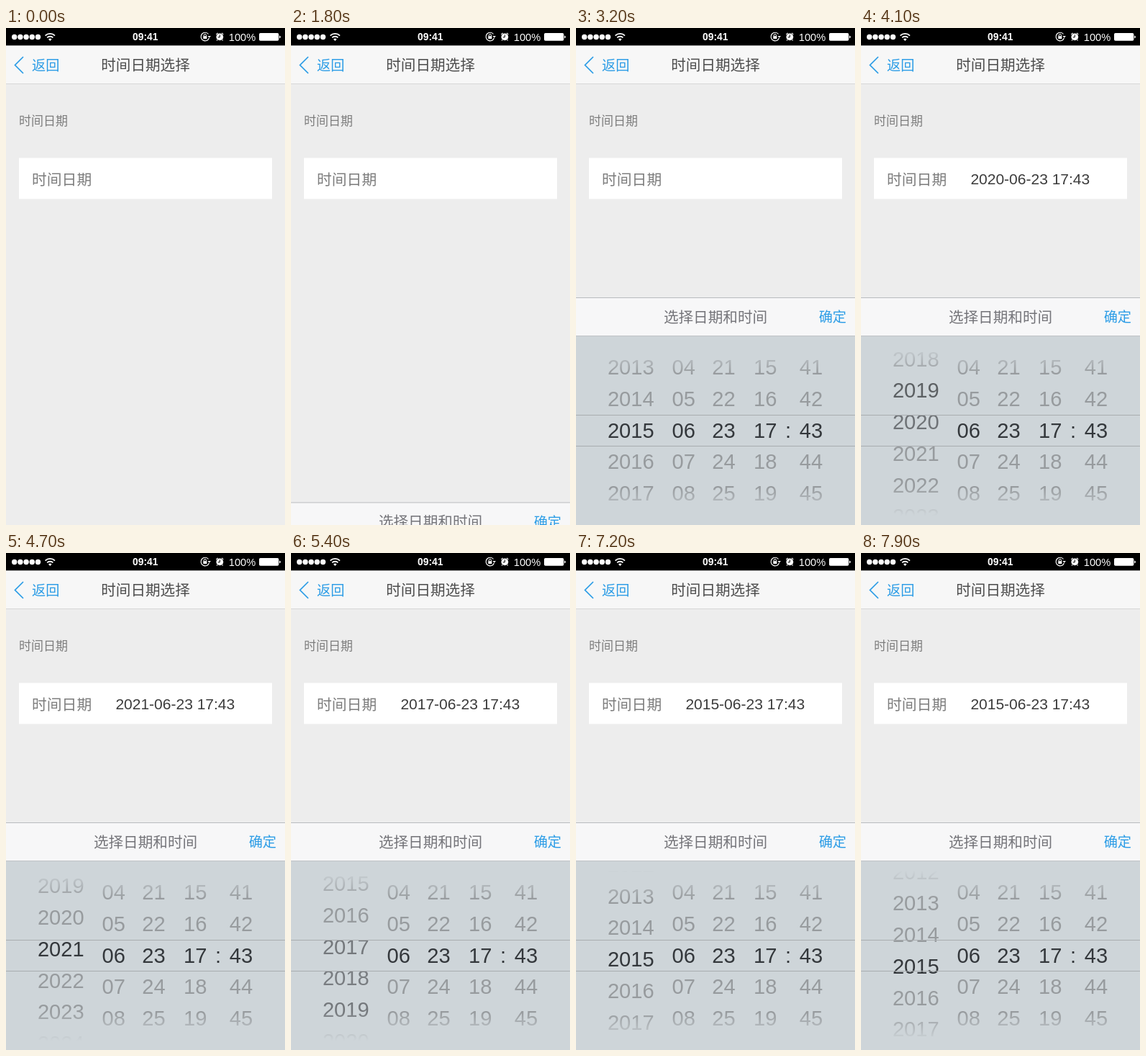
An HTML page for the animation above (8000 ms loop, 388 by 690 pixels).

```html
<!DOCTYPE html>
<html lang="zh-CN">
<head>
<meta charset="utf-8">
<title>时间日期选择</title>
<style>
  html, body { margin: 0; width: 100%; height: 100%; overflow: hidden; background: #ededed; }
  svg { display: block; width: 388px; height: 690px; }
  text { font-family: "Noto Sans CJK SC", "Noto Sans CJK", sans-serif; font-weight: 300; }
  .num { font-family: "Liberation Sans", Arial, sans-serif; font-weight: 400; }
  .mid { text-anchor: middle; }
  .link { fill: #2b9ce6; font-size: 19.2px; }
  .wheel text { font-size: 29.1px; }
</style>
</head>
<body>
<svg viewBox="0 0 388 690">
  <defs>
    <linearGradient id="fade" x1="0" y1="0" x2="0" y2="1">
      <stop offset=".05" stop-color="#000"/>
      <stop offset=".2" stop-color="#fff"/>
      <stop offset=".8" stop-color="#fff"/>
      <stop offset=".95" stop-color="#000"/>
    </linearGradient>
    <mask id="window" maskUnits="userSpaceOnUse" x="0" y="428" width="388" height="262" style="mask-type:luminance">
      <rect y="428" width="388" height="262" fill="url(#fade)"/>
    </mask>
  </defs>

  <rect width="388" height="690" fill="#ededed"/>

  <!-- navigation bar -->
  <rect y="24" width="388" height="53.7" fill="#f7f7f7"/>
  <rect y="77.1" width="388" height=".6" fill="#c4c4c4"/>
  <path d="M24 40L12.5 51.5L24 63" fill="none" stroke="#2b9ce6" stroke-width="1.7"/>
  <text class="link" x="36" y="58.6">返回</text>
  <text class="mid" x="194" y="58.9" font-size="20.6" fill="#4c4c4c">时间日期选择</text>

  <!-- status bar -->
  <rect width="388" height="24.3" fill="#000"/>
  <g id="dots" fill="#fff"></g>
  <g fill="none" stroke="#fff" stroke-width="1.9">
    <path d="M54.6 10.6a9.6 9.6 0 0 1 13.4 0M57.2 13.4a6 6 0 0 1 8.2 0"/>
    <path d="M61.3 18l-2.3-2.4a3.4 3.4 0 0 1 4.6 0z" fill="#fff" stroke="none"/>
    <path d="M281.5 8.5A5.8 5.8 0 1 0 282.4 14" stroke-width="1.2"/>
    <path d="M280.5 11h4.4l-2.2 2.8z" fill="#fff" stroke="none"/>
    <path d="M275.2 11.5v-1.4a1.6 1.6 0 0 1 3.2 0v1.4" stroke-width="1"/>
    <rect x="274.3" y="11.2" width="5" height="3.8" fill="#fff" stroke="none"/>
    <circle cx="297.3" cy="12.4" r="4.9" fill="#fff" stroke="none"/>
    <path d="M292.3 9.2l2.3-2.3M302.3 9.2L300 6.9M294 16.4l-.9 1.1M300.6 16.4l.9 1.1" stroke-width="1.2"/>
    <path d="M297.3 9.4v3.4h-2.6" stroke="#000" stroke-width="1"/>
    <rect x="352" y="7" width="27.3" height="10.8" rx="1.8" fill="#fff" stroke="none"/>
    <path d="M380.2 10.6q1.8 .6 1.8 1.9t-1.8 1.9z" fill="#fff" stroke="none"/>
  </g>
  <text class="num mid" x="193.7" y="17.4" font-size="13.8" fill="#fff" style="font-weight:700">09:41</text>
  <text class="num" x="309.8" y="17.6" font-size="14.6" fill="#fff">100%</text>

  <!-- form -->
  <text x="18" y="135.3" font-size="17" fill="#7d7d7d">时间日期</text>
  <rect x="18" y="180.4" width="352" height="56.9" fill="#fff"/>
  <text x="36" y="217.8" font-size="20.8" fill="#7d7d7d">时间日期</text>
  <text class="num" id="value" x="152.4" y="217" font-size="21" fill="#3c3c3c"></text>

  <!-- picker -->
  <g id="panel">
    <rect y="374.2" width="388" height="54" fill="#f7f7f8"/>
    <rect y="374" width="388" height="1" fill="#b9bbbe"/>
    <text class="mid" x="194" y="408.9" font-size="20.6" fill="#747479">选择日期和时间</text>
    <text class="link" x="337.7" y="408.4">确定</text>
    <rect y="428" width="388" height="262" fill="#ced5d9"/>
    <rect y="427" width="388" height="1" fill="#c0c3c6"/>
    <g class="wheel" mask="url(#window)">
      <g id="years"></g>
      <g id="others"></g>
    </g>
    <path d="M0 537.5H388M0 580.5H388" stroke="#a9adb0" stroke-width="1"/>
  </g>
</svg>

<script>
const LOOP = 8000, ROW = 43.73, CENTER = 558.8, FIRST = 2008, LAST = 2027;
const $ = id => document.getElementById(id);

function add(parent, tag, attrs, content = '') {
  const el = document.createElementNS('http://www.w3.org/2000/svg', tag);
  for (const name in attrs) el.setAttribute(name, attrs[name]);
  el.textContent = content;
  return parent.appendChild(el);
}

// Grey for an idle row, near black for the selected one
function shade(level) {
  const mix = (a, b) => Math.round(a + (b - a) * level);
  return `rgb(${mix(151, 52)},${mix(155, 56)},${mix(158, 60)})`;
}

function label(parent, x, row, content, level = 0) {
  return add(parent, 'text',
    { class: 'num mid', x, y: CENTER + 9.7 + row * ROW, fill: shade(level) }, content);
}

for (let i = 0; i < 5; i++) add($('dots'), 'circle', { cx: 11.7 + i * 8.2, cy: 12.5, r: 3.7 });

for (const [x, start] of [[149.7, 6], [205.5, 23], [263.3, 17], [327, 43]]) {
  for (let d = -3; d <= 3; d++) {
    label($('others'), x, d, String(start + d).padStart(2, '0'), d === 0 ? 1 : 0);
  }
}
label($('others'), 295, 0, ':', 1);

const yearRows = [];
for (let y = FIRST; y <= LAST; y++) yearRows.push(label($('years'), 76.3, y - 2015, y));

// Year at the centre of the wheel: [time, year]
const drag = [
  [0, 2015], [3250, 2015], [3400, 2016], [3700, 2017.8], [3850, 2019], [4000, 2019.3],
  [4100, 2020.25], [4300, 2021.5], [4700, 2021.2], [5050, 2019.4], [5230, 2019],
  [5350, 2017.4], [5400, 2017.27], [5700, 2017], [6200, 2016.3], [6380, 2015.52],
  [6500, 2015.36], [6900, 2015], [7900, 2014.65], [8000, 2014.62]
];
const slope = i => (drag[i + 1][1] - drag[i][1]) / (drag[i + 1][0] - drag[i][0]);

// Harmonic mean keeps the curve from overshooting its points
function tangent(i) {
  if (i === 0 || i === drag.length - 1) return 0;
  const a = slope(i - 1), b = slope(i);
  return a * b > 0 ? 2 * a * b / (a + b) : 0;
}

function yearAt(t) {
  let i = 0;
  while (i < drag.length - 2 && t >= drag[i + 1][0]) i++;
  const [t0, y0] = drag[i], [t1, y1] = drag[i + 1];
  const h = t1 - t0, u = Math.max(0, (t - t0) / h), v = 1 - u;
  return v * v * (1 + 2 * u) * y0 + u * u * (3 - 2 * u) * y1
    + h * u * v * (v * tangent(i) - u * tangent(i + 1));
}

// cubic-bezier(.25, .1, .25, 1)
function ease(x) {
  if (x <= 0) return 0;
  if (x >= 1) return 1;
  const bez = (a, b, s) => 3 * a * s * (1 - s) ** 2 + 3 * b * s * s * (1 - s) + s ** 3;
  let lo = 0, hi = 1;
  for (let i = 0; i < 20; i++) {
    const m = (lo + hi) / 2;
    if (bez(.25, .25, m) < x) lo = m; else hi = m;
  }
  return bez(.1, 1, lo);
}

function draw(t) {
  const year = yearAt(t);
  $('panel').setAttribute('transform', `translate(0 ${316 * (1 - ease((t - 1770) / 300))})`);
  $('years').setAttribute('transform', `translate(0 ${(2015 - year) * ROW})`);
  $('value').textContent = t > 3320 ? `${Math.round(year)}-06-23 17:43` : '';

  // A row darkens with the share of the last 200 ms it was selected
  const share = {}, steps = 20;
  for (let i = 0; i < steps; i++) {
    const y = Math.round(yearAt(t - i * 200 / steps));
    share[y] = (share[y] || 0) + 1 / steps;
  }
  yearRows.forEach((el, i) => el.setAttribute('fill', shade(share[FIRST + i] || 0)));
}

const begin = performance.now();
function tick() {
  draw((performance.now() - begin) % LOOP);
  requestAnimationFrame(tick);
}
tick();
</script>
</body>
</html>
```
